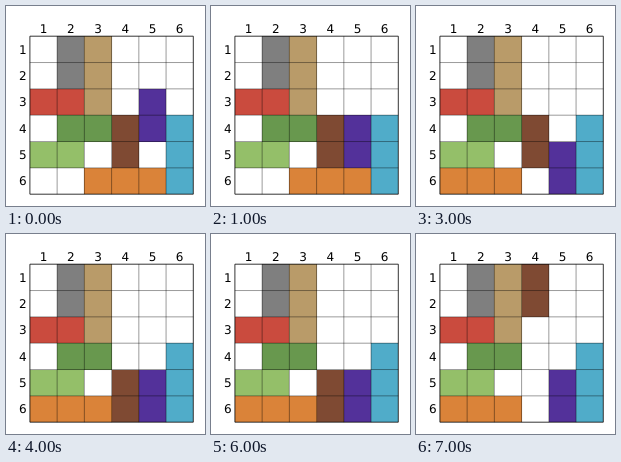
These frames come from a looping animation (199 px wide and 200 px high, 8000 ms). An HTML page:

```html
<!DOCTYPE html>
<html lang="en">
<head>
<meta charset="utf-8">
<title>Sliding blocks</title>
<style>
html, body { margin: 0; width: 100%; height: 100%; overflow: hidden; background: #fff; }
svg { display: block; width: 199px; height: 200px; }
text { font: 12px "DejaVu Sans", sans-serif; text-anchor: middle; text-rendering: geometricPrecision; }
path { fill: none; stroke: #000; }
</style>
</head>
<body>
<svg id="board" viewBox="0 0 199 200"></svg>
<script>
const LOOP = 8000;
const LEFT = 23.9, RIGHT = 187.3, TOP = 30.2, BOTTOM = 188.2;
const x = col => LEFT + (RIGHT - LEFT) * col / 6;
const y = row => TOP + (BOTTOM - TOP) * row / 6;

// Each stop is [start ms, column, row].
const blocks = [
  { color: '#7f7f7f', w: 1, h: 2, stops: [[0, 1, 0]] },
  { color: '#b99b69', w: 1, h: 3, stops: [[0, 2, 0]] },
  { color: '#ca4b3e', w: 2, h: 1, stops: [[0, 0, 2]] },
  { color: '#68984e', w: 2, h: 1, stops: [[0, 1, 3]] },
  { color: '#94bf69', w: 2, h: 1, stops: [[0, 0, 4]] },
  { color: '#da8339', w: 3, h: 1, stops: [[0, 2, 5], [2000, 0, 5]] },
  { color: '#7f4a33', w: 1, h: 2, stops: [[0, 3, 3], [4000, 3, 4], [7000, 3, 0]] },
  { color: '#53319a', w: 1, h: 2, stops: [[0, 4, 2], [1000, 4, 3], [3000, 4, 4]] },
  { color: '#50acc9', w: 1, h: 3, stops: [[0, 5, 3], [5000, 5, 0], [6000, 5, 3]] },
];

const board = document.getElementById('board');

function set(el, attrs) {
  for (const key in attrs) el.setAttribute(key, attrs[key]);
  return el;
}

function add(tag, attrs, text = '') {
  const el = document.createElementNS('http://www.w3.org/2000/svg', tag);
  el.textContent = text;
  return board.appendChild(set(el, attrs));
}

for (const b of blocks) {
  b.el = add('rect', { fill: b.color, 'shape-rendering': 'crispEdges' });
}

for (let i = 1; i < 6; i++) {
  add('path', { d: `M${x(i)} ${TOP}V${BOTTOM}`, 'stroke-width': 0.4 });
  add('path', { d: `M${LEFT} ${y(i)}H${RIGHT}`, 'stroke-width': 0.4 });
}
add('path', { d: `M${LEFT} ${TOP}H${RIGHT}V${BOTTOM}H${LEFT}Z`, 'stroke-width': 0.8 });

for (let i = 0; i < 6; i++) {
  add('text', { x: x(i + 0.5), y: 26.8 }, i + 1);
  add('text', { x: 16.8, y: y(i + 0.5) + 4.4 }, i + 1);
}

function draw(now) {
  const t = now % LOOP;
  for (const { el, w, h, stops } of blocks) {
    const [, col, row] = stops.findLast(stop => stop[0] <= t);
    const left = Math.round(x(col));
    const top = Math.round(y(row));
    set(el, {
      x: left,
      y: top,
      width: Math.round(x(col + w)) - left,
      height: Math.round(y(row + h)) - top,
    });
  }
}

const start = performance.now();
function tick(now) {
  draw(Math.max(0, now - start));
  requestAnimationFrame(tick);
}
draw(0);
requestAnimationFrame(tick);
</script>
</body>
</html>
```
